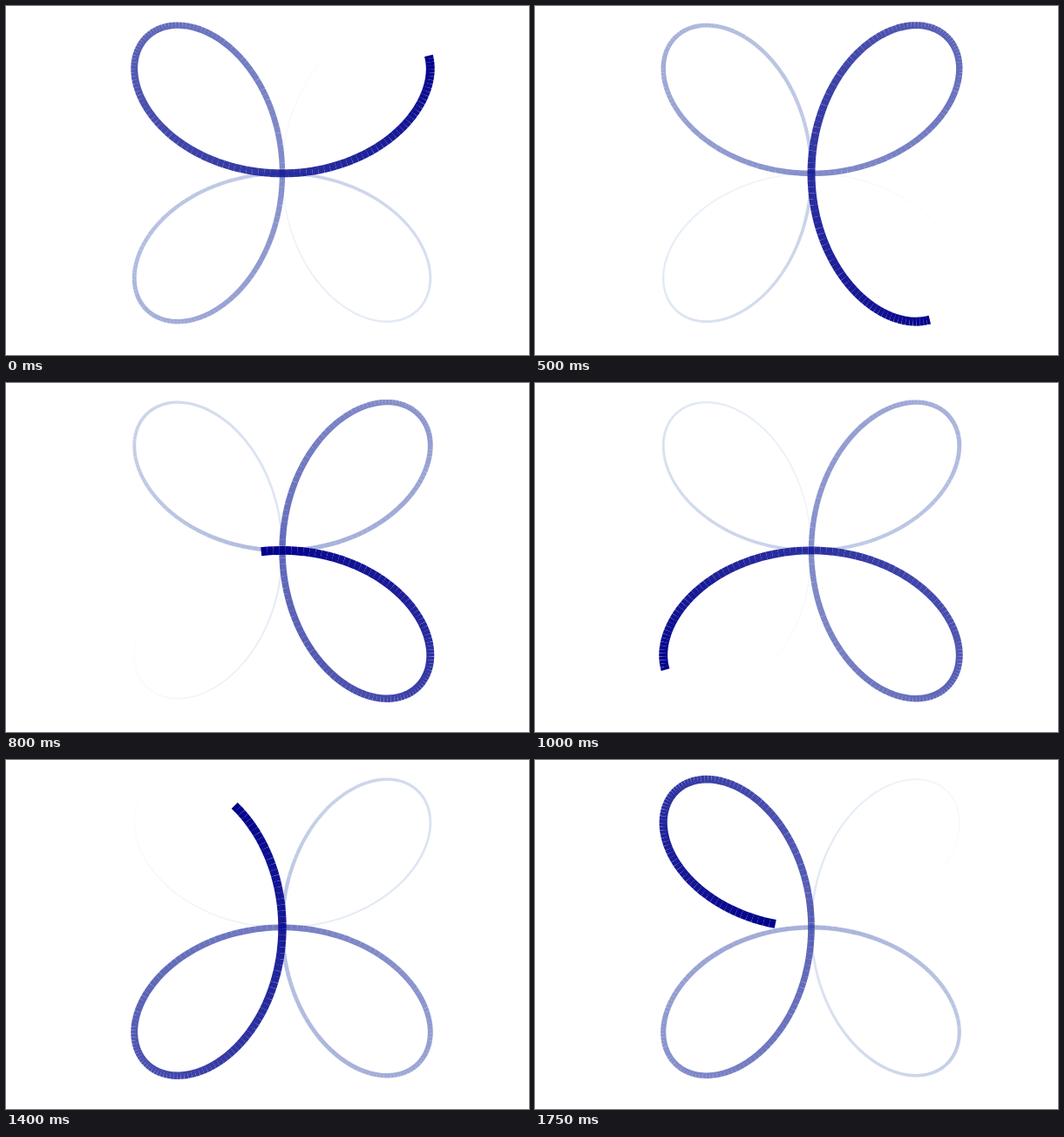
Recreate the animation shown at these times as an HTML page with a canvas. Size 600 px wide and 400 px high, loop 1800 ms.

```html
<!DOCTYPE html>
<html lang="en">
<head>
<meta charset="utf-8">
<title>Four-petal rose</title>
<style>
  html, body { margin: 0; width: 100%; height: 100%; overflow: hidden; background: #fff; }
  canvas { display: block; width: 600px; height: 400px; }
</style>
</head>
<body>
<canvas id="stage" width="600" height="400"></canvas>
<script>
const ctx = document.getElementById('stage').getContext('2d');
const N = 400;          // points on the closed curve
const STEP_MS = 50;
const STEPS = 36;
const FIRST = 44;       // oldest point of the trail at time 0
const STRIDE = 10;      // points travelled per step
const CX = 317, CY = 191.9, SIZE = 220.6;
const TAIL = [173, 216, 230], HEAD = [0, 0, 139];

const points = Array.from({ length: N }, (_, i) => {
  const a = 2 * Math.PI * i / (N - 1);
  const r = SIZE * Math.sin(2 * a);
  return [CX + r * Math.cos(a), CY - r * Math.sin(a)];
});

function shade(t) {
  const rgb = TAIL.map((c, i) => Math.round(c + (HEAD[i] - c) * t));
  return `rgba(${rgb}, ${t})`;
}

function draw(step) {
  ctx.fillStyle = '#fff';
  ctx.fillRect(0, 0, 600, 400);
  ctx.lineCap = 'butt';
  const start = FIRST + step * STRIDE;
  // separate segments keep the fine seams between them
  for (let k = 1; k < N - 1; k++) {
    const t = k / (N - 1);
    ctx.strokeStyle = shade(t);
    ctx.lineWidth = 10 * t;
    ctx.beginPath();
    ctx.moveTo(...points[(start + k) % N]);
    ctx.lineTo(...points[(start + k + 1) % N]);
    ctx.stroke();
  }
}

let shown = -1;
const origin = performance.now();

function tick() {
  const time = Math.max(0, performance.now() - origin);
  const step = Math.floor(time / STEP_MS) % STEPS;
  if (step !== shown) draw(shown = step);
  requestAnimationFrame(tick);
}
tick();
</script>
</body>
</html>
```
